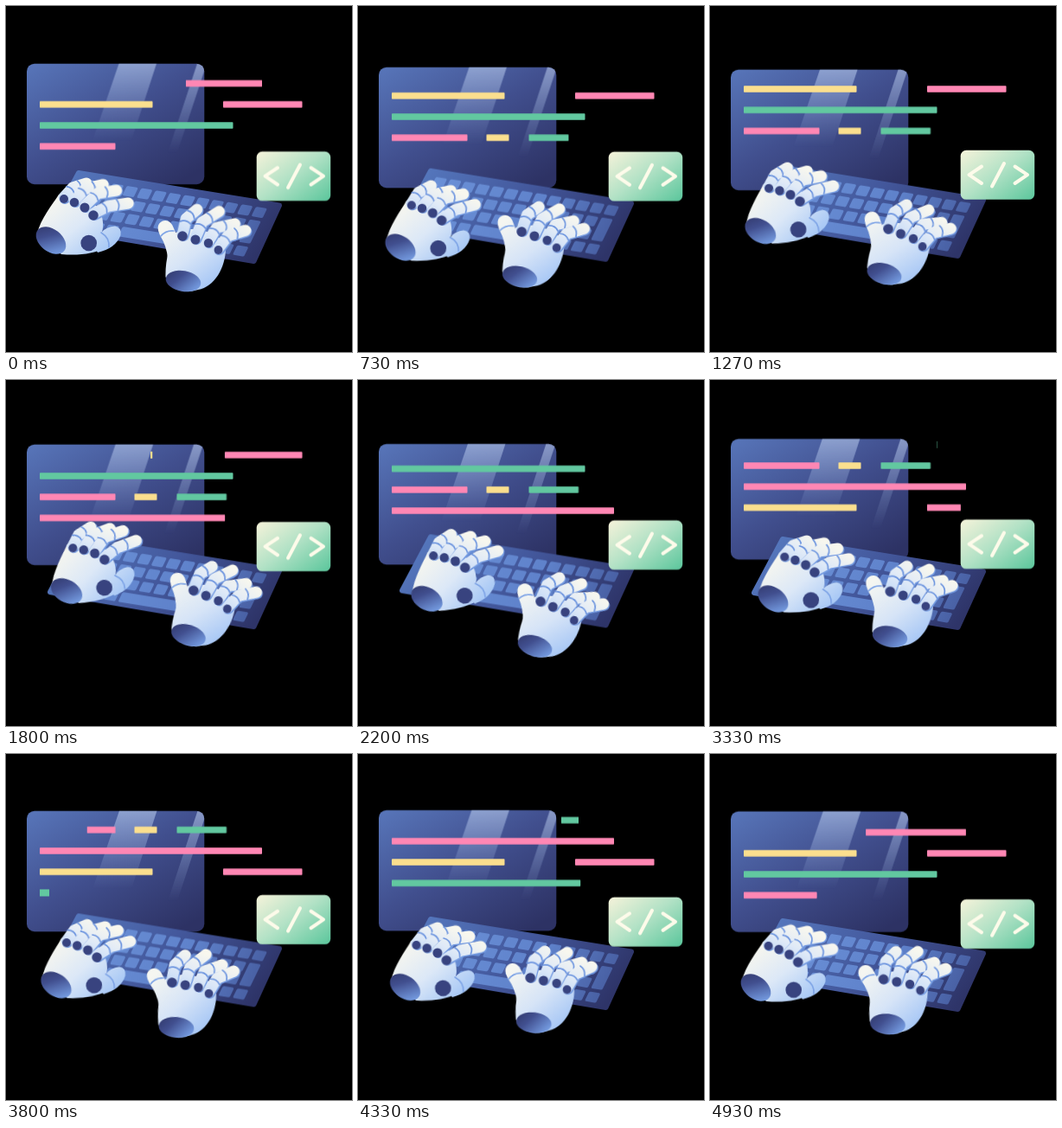
An HTML page for the animation above (5 s loop, 400 px wide and 400 px high).

```html
<!DOCTYPE html>
<html lang="en">
<head>
<meta charset="utf-8">
<title>Robot hands typing code</title>
<style>
  html, body { margin: 0; width: 100%; height: 100%; overflow: hidden; background: #000; }
  svg { display: block; width: 100%; height: 100%; }
  .bob { animation: bob 2.5s cubic-bezier(.37, 0, .63, 1) infinite alternate; }
  #screen { --a: 4.8px; animation-delay: -.7s; }
  #card { --a: 4px; animation-delay: -2.08s; }
  #keyboard { --a: 6px; animation-delay: -2.5s; }
  #glare { animation: slide 2.5s cubic-bezier(.37, 0, .63, 1) -.7s infinite alternate; }
  @keyframes bob {
    from { transform: translateY(calc(-1 * var(--a))); }
    to { transform: translateY(var(--a)); }
  }
  @keyframes slide {
    from { transform: translateX(2.4px); }
    to { transform: translateX(-2.4px); }
  }
  #left { transform-origin: 52px 271px; }
  #right { transform-origin: 205px 318px; }
  .line { fill: none; stroke-linecap: round; stroke-linejoin: round; }
</style>
</head>
<body>
<svg viewBox="0 0 400 400">
  <defs>
    <linearGradient id="gScreen" x1="0" y1="0" x2=".85" y2="1">
      <stop offset="0" stop-color="#5876ba"/><stop offset=".5" stop-color="#414f8e"/><stop offset="1" stop-color="#2d3264"/>
    </linearGradient>
    <linearGradient id="gGlare" x1="0" y1="0" x2="0" y2="1">
      <stop offset="0" stop-color="#c6d8f6" stop-opacity=".55"/><stop offset="1" stop-color="#a5c0ef" stop-opacity="0"/>
    </linearGradient>
    <linearGradient id="gBoard" x1="0" y1=".3" x2="1" y2=".6">
      <stop offset="0" stop-color="#5577bd"/><stop offset=".5" stop-color="#43579b"/><stop offset="1" stop-color="#2e3468"/>
    </linearGradient>
    <linearGradient id="gKey" gradientUnits="userSpaceOnUse" x1="0" y1="0" x2="240" y2="0">
      <stop offset="0" stop-color="#6c92d8"/><stop offset=".6" stop-color="#5f82cb"/><stop offset="1" stop-color="#465c9f"/>
    </linearGradient>
    <linearGradient id="gCard" x1="0" y1="0" x2="1" y2=".9">
      <stop offset="0" stop-color="#f6f3da"/><stop offset=".5" stop-color="#b3e2c6"/><stop offset="1" stop-color="#63c9a0"/>
    </linearGradient>
    <linearGradient id="gWrist" x1="0" y1="0" x2="1" y2=".5">
      <stop offset="0" stop-color="#2f3669"/><stop offset=".45" stop-color="#414f8f"/><stop offset="1" stop-color="#7196db"/>
    </linearGradient>
    <linearGradient id="gLeft" gradientUnits="userSpaceOnUse" x1="58" y1="218" x2="112" y2="290">
      <stop offset="0" stop-color="#f8f7ee"/><stop offset=".5" stop-color="#dce8f7"/><stop offset="1" stop-color="#a3c5f5"/>
    </linearGradient>
    <linearGradient id="gRight" gradientUnits="userSpaceOnUse" x1="190" y1="250" x2="246" y2="324">
      <stop offset="0" stop-color="#f5f6f1"/><stop offset=".5" stop-color="#d6e4f7"/><stop offset="1" stop-color="#9fc2f5"/>
    </linearGradient>
    <clipPath id="inScreen"><rect x="24" y="69.7" width="205.3" height="139.5" rx="9"/></clipPath>
  </defs>
  <rect width="400" height="400"/>

  <g id="screen" class="bob">
    <rect x="24" y="69.7" width="205.3" height="139.5" rx="9" fill="url(#gScreen)"/>
    <g clip-path="url(#inScreen)">
      <g id="glare" fill="url(#gGlare)">
        <path d="M129.500 68H173L143 160H98Z"/>
        <path d="M220 68H231L196 174H185Z"/>
      </g>
    </g>
    <g id="code"></g>
  </g>

  <g id="keyboard" class="bob">
    <path d="M84 187L316 224.500L286.500 289L51 249Z" fill="url(#gBoard)" stroke="url(#gBoard)" stroke-width="6" stroke-linejoin="round"/>
    <g id="keys" transform="matrix(.992 .16 -.47 .97 81 184)" fill="url(#gKey)"></g>
  </g>

  <g id="card" class="bob">
    <rect x="289.700" y="164.800" width="85.500" height="57" rx="6.500" fill="url(#gCard)"/>
    <path class="line" d="M314 183.500L299.500 193.200L314 203M340 180L326 206.500M352.500 183.500L367 193.200L352.500 203" stroke="#fdfbea" stroke-width="4"/>
  </g>

  <g id="left">
    <path d="M36 263C40 246 54 229 61 218C78 210 106 224 111 244C113 252 112 260 110 263L112 280C104 286 84 289 64 287Z" fill="url(#gLeft)"/>
  </g>
  <g id="right">
    <path d="M184.500 313C184 294 189 276 196 262C214 252 252 262 254 280C254 302 241 325 222 328C205 333 190 328 184.500 313Z" fill="url(#gRight)"/>
  </g>
</svg>
<script>
  const LOOP = 5000, SINE = 'cubic-bezier(.37, 0, .63, 1)';
  const PINK = '#ff87b4', YELLOW = '#fbdf8e', GREEN = '#62c8a0';
  const $ = id => document.getElementById(id);

  function add(parent, tag, attrs) {
    const el = document.createElementNS('http://www.w3.org/2000/svg', tag);
    for (const k in attrs) el.setAttribute(k, attrs[k]);
    return parent.appendChild(el);
  }
  const loop = (el, frames, start = 0) =>
    el.animate(frames, { duration: LOOP, iterations: Infinity, delay: start ? start - LOOP : 0 });

  // Code lines scroll up steadily; each wraps while it is empty.
  const ROW = 24.25, SPEED = 4 * ROW / LOOP;
  const rows = [900, 2300, 3500, 4500].map((wrap, i) => {
    const y = 69.7 + 119.9 + ROW * i - SPEED * wrap;
    const g = add($('code'), 'g', {});
    loop(g, [{ transform: `translateY(${y}px)` }, { transform: `translateY(${y - 4 * ROW}px)` }], wrap);
    return g;
  });

  // A bar is typed from its left end, then erased from the left.
  function bar(row, x, end, fill, type, typeDur, erase, eraseDur) {
    const w = end - x;
    const el = add(rows[row], 'rect', { y: -3.75, width: w, height: 7.5, rx: .8, fill });
    const key = (t, at, s) => ({
      offset: (t - type) / LOOP, easing: SINE, transform: `translateX(${at}px) scaleX(${s})`
    });
    loop(el, [
      key(type, x, 0), key(type + typeDur, x, 1),
      key(erase, x, 1), key(erase + eraseDur, end, 0), key(type + LOOP, end, 0)
    ], type % LOOP);
  }
  bar(0, 39, 296, PINK, 1300, 685, 4400, 1000);
  bar(1, 39, 169.5, YELLOW, 2426, 400, 6400, 440);
  bar(1, 251, 342.5, PINK, 3150, 400, 6760, 440);
  bar(2, 39, 262.5, GREEN, 3700, 700, 7700, 650);
  bar(3, 39, 126.5, PINK, 4578, 400, 8540, 450);
  bar(3, 148.5, 174.5, YELLOW, 5150, 200, 8980, 160);
  bar(3, 197.5, 255, GREEN, 5520, 300, 9140, 320);

  // Keys in the board's own slanted plane.
  const key = (x, y, width, height = 11.5) => add($('keys'), 'rect', { x, y, width, height, rx: 1.8 });
  for (let r = 0; r < 4; r++) {
    for (let c = 0; c < 13; c++) {
      const x = 13 + c * 16.7, y = 8 + r * 15.3;
      if (r === 3 && c > 3 && c < 9) continue;
      if (c === 12 && r === 2) continue;
      key(x, y, 13.2, c === 12 && r === 1 ? 26.8 : 11.5);
    }
  }
  key(79.8, 53.9, 80);

  // Closed smooth curve through [time, ...values] points.
  function spline(pts, t) {
    const n = pts.length;
    const at = i => {
      const turn = Math.floor(i / n), p = pts[i - turn * n];
      return [p[0] + turn * LOOP, ...p.slice(1)];
    };
    let i = n - 1;
    while (pts[i][0] > t) i--;
    const [a, b, c, d] = [at(i - 1), at(i), at(i + 1), at(i + 2)];
    const h = c[0] - b[0], u = (t - b[0]) / h, u2 = u * u, u3 = u2 * u;
    return b.slice(1).map((v, k) => {
      k++;
      const m0 = (c[k] - a[k]) / (c[0] - a[0]), m1 = (d[k] - b[k]) / (d[0] - b[0]);
      return v * (2 * u3 - 3 * u2 + 1) + c[k] * (3 * u2 - 2 * u3)
        + h * (m0 * (u3 - 2 * u2 + u) + m1 * (u3 - u2));
    });
  }
  function follow(el, pts) {
    const frames = [];
    for (let t = 0; t <= LOOP; t += 20) {
      const [x, y, r] = spline(pts, t % LOOP);
      frames.push({ transform: `translate(${x}px, ${y}px) rotate(${r}deg)` });
    }
    loop(el, frames);
  }

  // A bent finger: shade, skin and two joint creases.
  function finger(hand, skin, [x, y, mx, my, tx, ty], width = 13) {
    const g = add(hand, 'g', {}), d = `M${x} ${y}L${mx} ${my}L${tx} ${ty}`;
    g.style.transformOrigin = `${x}px ${y}px`;
    add(g, 'path', { class: 'line', d, stroke: '#7299e0', 'stroke-width': width, transform: 'translate(1 1.4)' });
    add(g, 'path', { class: 'line', d, stroke: skin, 'stroke-width': width });
    const crease = (ax, ay, bx, by, f) => {
      const len = Math.hypot(bx - ax, by - ay), ux = (bx - ax) / len, uy = (by - ay) / len;
      const cx = ax + (bx - ax) * f, cy = ay + (by - ay) * f, w = width / 2 - .4;
      add(g, 'path', {
        class: 'line', stroke: '#6d95df', 'stroke-width': 1.7,
        d: `M${cx + uy * w} ${cy - ux * w}Q${cx + ux * 4} ${cy + uy * 4} ${cx - uy * w} ${cy + ux * w}`
      });
    };
    crease(x, y, mx, my, .75);
    crease(mx, my, tx, ty, .45);
    return g;
  }
  function wiggle(el, i) {
    el.animate([{ transform: 'rotate(-2.5deg)' }, { transform: 'rotate(2.5deg)' }],
      { duration: 500, delay: -170 * i, easing: SINE, iterations: Infinity, direction: 'alternate' });
  }
  const dot = (hand, cx, cy, r) => add(hand, 'circle', { cx, cy, r, fill: '#38437f' });
  function wrist(hand, cx, cy, rx, ry, turn) {
    add(hand, 'ellipse', { cx, cy, rx, ry, fill: 'url(#gWrist)', transform: `rotate(${turn} ${cx} ${cy})` });
  }

  const left = $('left'), right = $('right');
  const leftFingers = [
    [67, 221, 77, 210, 93, 205], [79, 225, 92, 212, 113, 208],
    [91, 231, 106, 217, 128, 214], [101, 240, 118, 231, 141, 227]
  ].map(p => finger(left, 'url(#lTip)', p));
  const rightFingers = [
    [204, 264, 209, 246, 222, 236], [219, 268, 227, 250, 247, 238],
    [234, 272, 243, 256, 264, 251], [245.5, 280, 256, 265, 276, 258]
  ].map(p => finger(right, 'url(#rTip)', p));

  function tipGradient(id, x1, y1, x2, y2) {
    const g = add(document.querySelector('defs'), 'linearGradient',
      { id, x1, y1, x2, y2, gradientUnits: 'userSpaceOnUse' });
    [[0, '#c3d9f7'], [.45, '#e0eaf7'], [1, '#f8f7ee']].forEach(([offset, color]) =>
      add(g, 'stop', { offset, 'stop-color': color }));
  }
  tipGradient('lTip', 90, 242, 110, 204);
  tipGradient('rTip', 228, 280, 250, 238);

  // Thumbs
  add(left, 'path', { d: 'M97 270L110 262Q116 255 126 254.500Q134 256 132.500 265Q127 280 106 285Z', fill: 'url(#gLeft)' });
  add(left, 'path', { class: 'line', d: 'M110 262Q120 268 119 279', stroke: '#7ea4e6', 'stroke-width': 1.6 });
  add(right, 'path', { d: 'M187 292Q186 278 178 265Q172 253 181 248.500Q190 246 194 257L202 276Z', fill: 'url(#gRight)' });
  add(right, 'path', { class: 'line', d: 'M179 266Q185 259 194 260', stroke: '#7ea4e6', 'stroke-width': 1.6 });

  [[67, 223], [79, 227], [91, 233], [101, 242]].forEach(([x, y], i) => dot(left, x, y, 5 + i * .25));
  dot(left, 95.7, 274, 9.3);
  [[204, 266], [219, 270], [234, 274], [245.5, 282]].forEach(([x, y], i) => dot(right, x, y, 5.8 - i * .3));
  wrist(left, 52, 271, 19.5, 13, 38);
  wrist(right, 205, 318, 20.5, 12, 10);

  follow(leftFingers[0], [
    [0, 0, 0, 0], [730, 0, 0, -8], [1800, 0, 0, -6], [2670, 0, 0, -8],
    [3330, 0, 0, 1], [3800, 0, 0, -3], [4930, 0, 0, 0]
  ]);
  leftFingers.slice(1).forEach(wiggle);
  rightFingers.forEach(wiggle);

  follow(left, [
    [0, 0, 0, 0], [730, -3, 8, -2.5], [1800, 18, -27, -9], [2670, 35, -4, -6.5],
    [3330, 21, -18, -2], [3800, 6, -4, -3.5], [4930, 1, -1, -.5]
  ]);
  follow(right, [
    [0, 0, 0, 0], [200, -6, 8.5, 3], [480, -13, -2, 4], [730, -18, -5, 3.5],
    [1000, -10, -13, 5], [1250, -4, -8, 6], [1500, 2, -19, 7], [1800, 6, -23, 7.5],
    [2060, 2, -12, 8], [2420, -4, -11, 8.5], [2670, -6.5, -18, 8], [2970, -2, -7, 5],
    [3330, 3, -21.5, 1.5], [3640, -3, -8, -2], [3800, -8, -2, -4.5], [4130, -4, -10, -3],
    [4500, 0, -5, -4], [4700, 1, -10, -5], [4860, 1, -4.5, -5], [4930, .5, -6, -4.5]
  ]);
</script>
</body>
</html>
```
